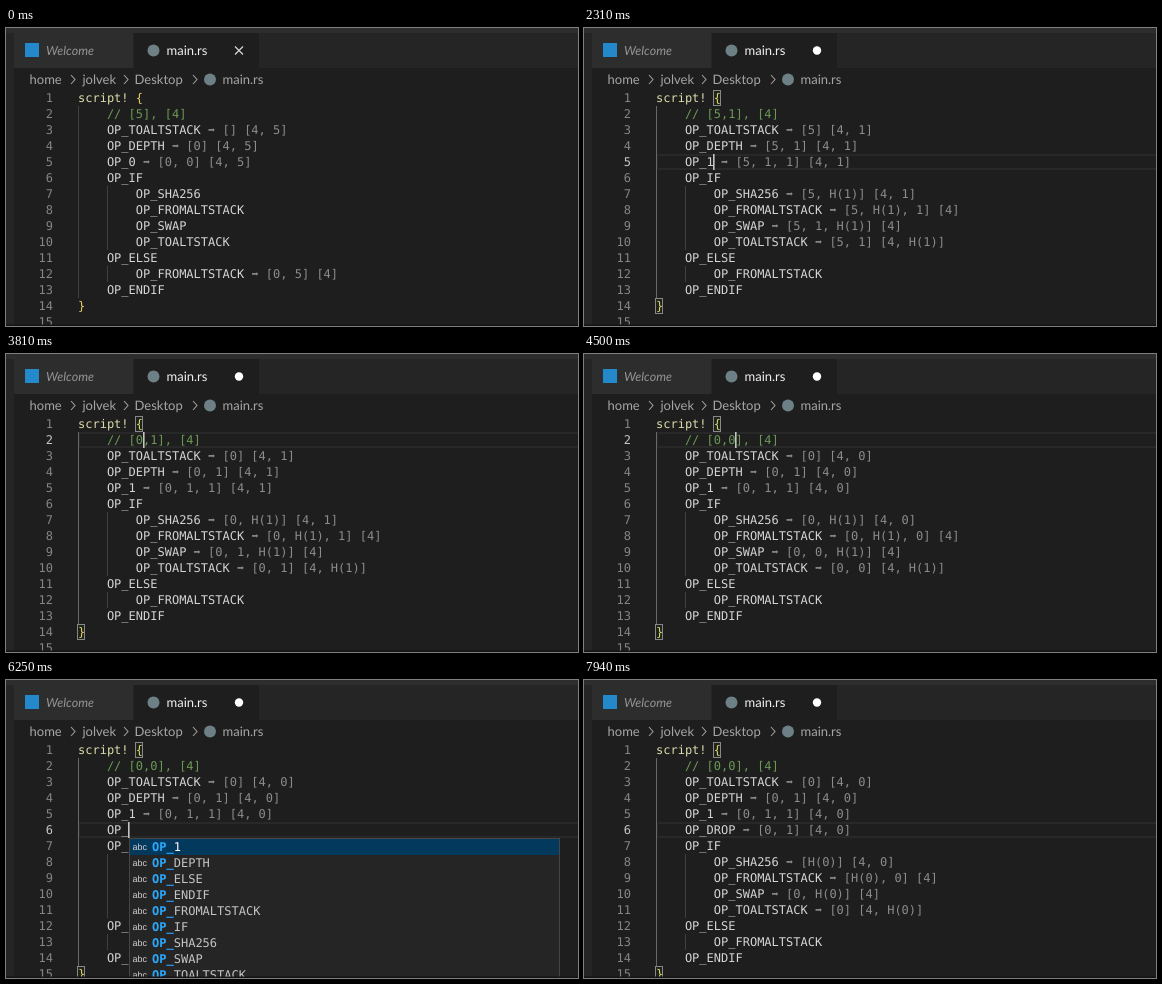
Animation of 572 by 298 pixels, one loop 8000 ms. Source, as an HTML page:

```html
<!DOCTYPE html>
<html lang="en">
<head>
<meta charset="utf-8">
<title>Script stack hints</title>
<style>
  html, body { margin: 0; width: 100%; height: 100%; overflow: hidden; background: #1e1e1e; }
  svg { display: block; }
  text { white-space: pre; text-rendering: geometricPrecision; }
  .ui { font: 13px Lato, "Open Sans", sans-serif; fill: #a6a6a6; }
  .code { font: 12px "DejaVu Sans Mono", monospace; fill: #d4d4d4; }
  .match { font-weight: bold; fill: #2aaaff; }
</style>
</head>
<body>
<svg width="572" height="298" viewBox="0 0 572 298">
  <g id="frame"></g>
  <g id="editor"></g>
  <rect y="296.5" width="572" height="1.5" fill="#171216"/>
</svg>
<script>
const LOOP = 8000, BLINK = 250;
const CH = 7.224, LEFT = 72, TOP = 62, ROW = 16;
const frame = document.getElementById('frame');
const editor = document.getElementById('editor');

const rect = (x, y, w, h, fill, more = '') =>
  `<rect x="${x}" y="${y}" width="${w}" height="${h}" fill="${fill}" ${more}/>`;
const text = (x, y, s, cls, more = '') =>
  `<text x="${x}" y="${y}" class="${cls}" ${more}>${s}</text>`;
const code = (x, y, s, fill, more = '') => text(x, y, s, 'code', `style="fill:${fill}" ${more}`);
const disc = (x, y, r, fill) => `<circle cx="${x}" cy="${y}" r="${r}" fill="${fill}"/>`;
const stroke = (d, color, w = 1.1) =>
  `<path d="${d}" fill="none" stroke="${color}" stroke-width="${w}"/>`;
const lineTop = n => TOP + (n - 1) * ROW;
const colX = c => LEFT + c * CH;

// Each step changes part of the state; "calc" refreshes the stack hints.
const steps = [
  [0, { args: '5', num: '0', extra: null, row: 0, col: 0, calc: 1 }],
  [750, { row: 2, col: 5 }],
  [1250, { args: '5,', col: 6, dirty: 1 }],
  [1380, { args: '5,1', col: 7, calc: 1 }],
  [1690, { row: 3 }],
  [1750, { row: 4 }],
  [1810, { row: 5, col: 4 }],
  [2060, { num: '', col: 3 }],
  [2190, { num: '1', col: 4, calc: 1 }],
  [2880, { row: 4 }],
  [2940, { row: 3 }],
  [3000, { row: 2 }],
  [3130, { col: 5, mark: 1 }],
  [3690, { args: ',1', col: 4, mark: 0 }],
  [3750, { args: '0,1', col: 5, calc: 1 }],
  [4190, { col: 6 }],
  [4250, { col: 7 }],
  [4310, { args: '0,', col: 6 }],
  [4440, { args: '0,0', col: 7, calc: 1 }],
  [4560, { row: 3 }],
  [4620, { row: 4 }],
  [4690, { row: 5, col: 4 }],
  [4880, { extra: '', row: 6, col: 0 }],
  [5560, { extra: 'o', col: 1 }],
  [5750, { extra: '', col: 0 }],
  [5810, { extra: 'O', col: 1, popup: 1 }],
  [6000, { extra: 'OP', col: 2 }],
  [6190, { extra: 'OP_', col: 3 }],
  [6940, { extra: 'OP_D', col: 4 }],
  [7060, { extra: 'OP_DR', col: 5, popup: 0 }],
  [7120, { extra: 'OP_DRO', col: 6 }],
  [7190, { extra: 'OP_DROP', col: 7 }],
  [7250, { calc: 1, idle: 1 }]
];

function listing(s) {
  const lines = [
    [0, 'script! {'], [1, `// [${s.args}], [4]`],
    [1, 'OP_TOALTSTACK'], [1, 'OP_DEPTH'], [1, 'OP_' + s.num],
    [1, 'OP_IF'], [2, 'OP_SHA256'], [2, 'OP_FROMALTSTACK'], [2, 'OP_SWAP'], [2, 'OP_TOALTSTACK'],
    [1, 'OP_ELSE'], [2, 'OP_FROMALTSTACK'], [1, 'OP_ENDIF'], [0, '}']
  ];
  if (s.extra !== null) lines.splice(5, 0, [1, s.extra]);
  return lines;
}

// Runs the script and returns the stacks after every live operation.
function runScript(s) {
  const main = s.args.split(','), alt = ['4'];
  const ops = {
    OP_TOALTSTACK: () => alt.push(main.pop()),
    OP_FROMALTSTACK: () => main.push(alt.pop()),
    OP_DEPTH: () => main.push(String(main.length)),
    OP_0: () => main.push('0'),
    OP_1: () => main.push('1'),
    OP_DROP: () => main.pop(),
    OP_SHA256: () => main.push(`H(${main.pop()})`),
    OP_SWAP: () => main.push(main.pop(), main.pop())
  };
  const show = a => `[${a.join(', ')}]`;
  let live = true;
  return listing(s).map(([, op]) => {
    if (op === 'OP_IF') live = main.pop() !== '0';
    else if (op === 'OP_ELSE') live = !live;
    else if (op === 'OP_ENDIF') live = true;
    else if (live && ops[op]) {
      ops[op]();
      return show(main) + ' ' + show(alt);
    }
    return '';
  });
}

function stateAt(t) {
  const s = {};
  let hints;
  for (const [at, change] of steps) {
    if (at > t) break;
    Object.assign(s, change);
    if (change.calc) hints = runScript(s);
    if (!change.idle) s.key = at;
  }
  s.hints = hints;
  s.caret = s.row > 0 && Math.floor((t - s.key) / BLINK) % 2 === 0;
  return s;
}

function drawFrame() {
  const chevron = x => stroke(`M${x - 2} 47l4 4.5l-4 4.5`, '#a0a0a0');
  frame.innerHTML =
    rect(0, 0, 572, 298, '#1e1e1e') +
    rect(0, 0, 8, 298, '#252526') +
    rect(8, 5, 564, 35, '#252526') +
    rect(0, 0, 572, 5, '#2d2d2d') +
    rect(8, 5, 119, 35, '#2d2d2d') +
    rect(128, 5, 125, 35, '#1e1e1e') +
    rect(19, 15, 14, 14, '#2489ca') +
    text(40, 27, 'Welcome', 'ui', 'style="font-style:italic;font-size:12.5px;fill:#949494"') +
    disc(147.5, 22.5, 6, '#6d8086') +
    text(160.5, 27, 'main.rs', 'ui', 'style="fill:#f0f0f0"') +
    text(23.5, 56, 'home', 'ui') + chevron(67) +
    text(76.5, 56, 'jolvek', 'ui') + chevron(120) +
    text(128.5, 56, 'Desktop', 'ui') + chevron(189) +
    disc(204, 51.5, 6, '#6d8086') +
    text(216.5, 56, 'main.rs', 'ui');
}

function drawLine(s, [depth, str], n) {
  const y = lineTop(n) + 12, x = colX(depth * 4);
  let out = code(47, y, n, n === s.row ? '#c6c6c6' : '#858585', 'text-anchor="end"');
  if (n === 1) {
    out += code(x, y, 'script!', '#dcdcaa') + code(colX(8), y, '{', '#e8cf6a');
  } else {
    const color = str[0] === '/' ? '#6a9955' : str === '}' ? '#e8cf6a' : str === 'o' ? '#9cdcfe' : '#d4d4d4';
    out += code(x, y, str, color);
  }
  const hint = s.hints[n - 1];
  if (hint) {
    const end = x + str.length * CH;
    out += code(end + CH, y, '➡', '#8c8c8c') + code(end + 3 * CH, y, hint, '#8c8c8c');
  }
  return out;
}

const words = ['1', 'DEPTH', 'ELSE', 'ENDIF', 'FROMALTSTACK', 'IF', 'SHA256', 'SWAP', 'TOALTSTACK']
  .map(w => 'OP_' + w);

function markMatch(word, typed) {
  let i = 0;
  const html = [...word].map(c => c === typed[i] ? (i++, `<tspan class="match">${c}</tspan>`) : c).join('');
  return i === typed.length ? html : null;
}

function drawPopup(s) {
  const x = Math.round(colX(4 + s.col)) + 1, y = lineTop(s.row + 1);
  const rows = words.map(w => markMatch(w, s.extra)).filter(Boolean);
  let out = rect(x - 0.5, y + 0.5, 430, rows.length * ROW + 1, '#252526', 'stroke="#454545"') +
    rect(x, y + 1, 429, ROW, '#04395e');
  rows.forEach((row, i) => {
    const base = y + 13 + i * ROW;
    out += text(x + 2.5, base - 1, 'abc', 'ui',
      'style="font:9px \'Liberation Sans\',sans-serif;fill:#d0d0d0"');
    out += code(x + 22, base, row, i ? '#c4c4c4' : '#ffffff');
  });
  return out;
}

function draw(s) {
  const lines = listing(s), last = lines.length;
  let out = s.dirty ? disc(233, 22.5, 4.2, '#ffffff')
    : stroke('M229 18.5l8 8m0 -8l-8 8', '#d8d8d8', 1.2);

  if (s.row) {
    out += rect(LEFT + 1, lineTop(s.row) + 1, 520, ROW - 2, 'none', 'stroke="#282828" stroke-width="2"');
    for (const [col, n] of [[8, 1], [0, last]])
      out += rect(Math.round(colX(col)) - 0.5, lineTop(n) + 0.5, 7, ROW - 1, '#1b251b', 'stroke="#888"');
  }
  if (s.mark) out += rect(colX(8), lineTop(2), CH, ROW, '#484848');

  out += rect(LEFT, lineTop(2), 1, (last - 2) * ROW, s.row ? '#686868' : '#404040');
  lines.forEach(([depth], i) => {
    if (depth === 2) out += rect(101, lineTop(i + 1), 1, ROW, '#404040');
  });

  lines.forEach((line, i) => { out += drawLine(s, line, i + 1); });
  if (last < 15) out += code(47, lineTop(15) + 12, 15, '#858585', 'text-anchor="end"');
  if (s.popup) out += drawPopup(s);
  if (s.caret) out += rect(Math.floor(colX(4 + s.col)), lineTop(s.row), 1.6, ROW, '#c4c4c2');
  editor.innerHTML = out;
}

let shown = '';
function tick() {
  const s = stateAt(performance.now() % LOOP);
  const id = JSON.stringify(s);
  if (id !== shown) {
    shown = id;
    draw(s);
  }
  requestAnimationFrame(tick);
}

drawFrame();
tick();
</script>
</body>
</html>
```
